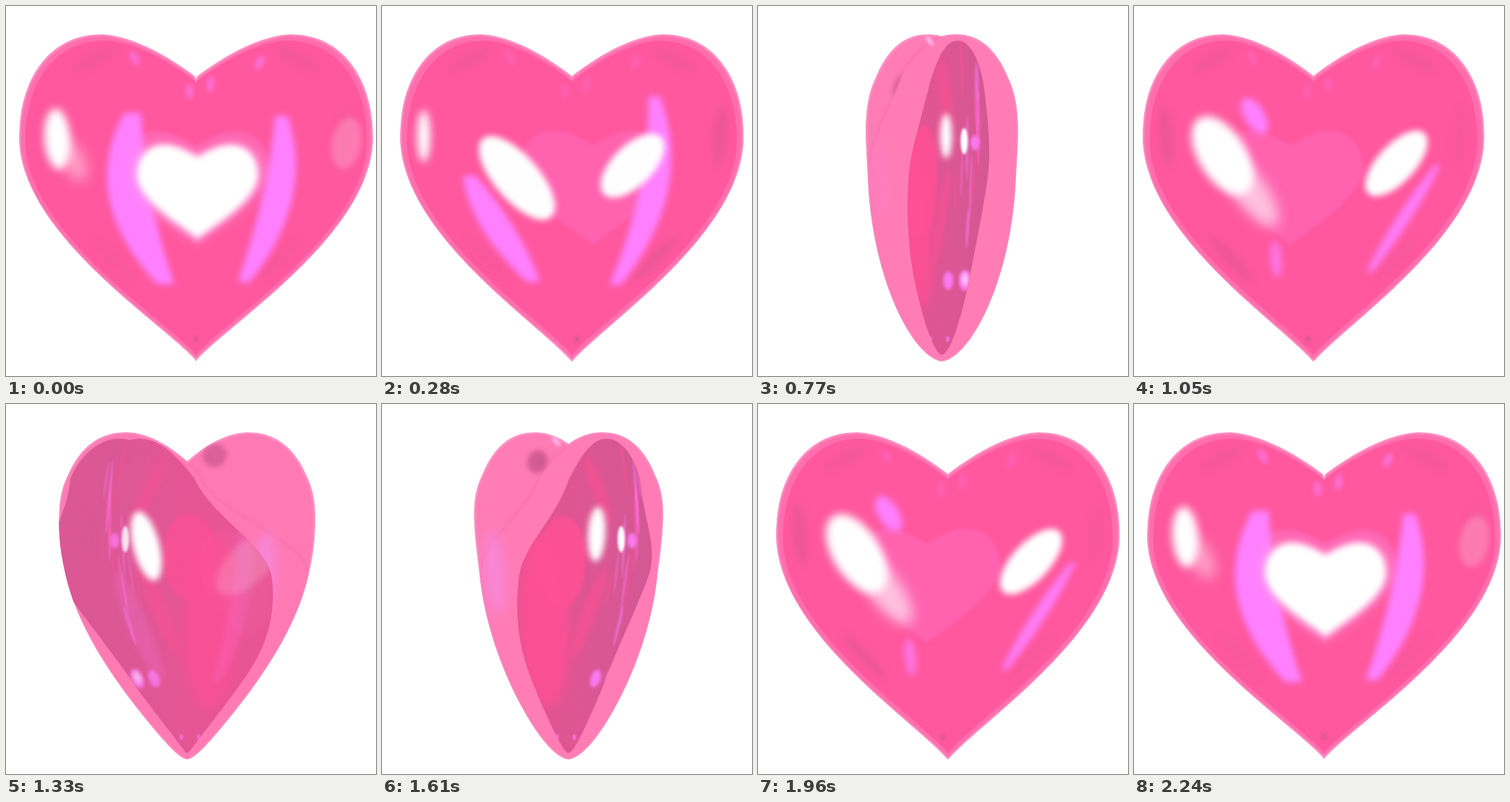
An HTML page with a canvas that plays this animation: 512 px wide and 512 px high, repeating every 2310 ms.

```html
<!DOCTYPE html>
<html lang="en">
<head>
<meta charset="utf-8">
<title>Spinning glass heart</title>
<style>
html, body { margin: 0; width: 100%; height: 100%; overflow: hidden; background: #fff; }
canvas { display: block; width: 100vmin; height: 100vmin; }
</style>
</head>
<body>
<canvas id="stage" width="512" height="512"></canvas>
<script>
const ctx = document.getElementById('stage').getContext('2d');
const STEP = 70, FRAMES = 33, RAD = Math.PI / 180;
const TOP = 39, NOTCH = 98, WIDEST = 185, TIP = 492;
const WHITE = '#fff', PURPLE = '#ff80ff', PINK = '#fd5095', DARK = '#cc568e';

const clamp = (v, lo, hi) => Math.min(hi, Math.max(lo, v));
const lerp = (a, b, t) => a + (b - a) * t;
const mix = (a, b, t) => a.map((v, i) => lerp(v, b[i], t));
const rgb = c => `rgb(${c.map(Math.round).join()})`;
const smooth = (lo, hi, v) => {
  const t = clamp((v - lo) / (hi - lo), 0, 1);
  return t * t * (3 - 2 * t);
};
// Blend of three poses for t from -1 to 1.
const pose = (t, left, mid, right) => t < 0 ? mix(mid, left, -t) : mix(mid, right, t);

function random(seed) {
  return () => (seed = seed * 16807 % 2147483647) / 2147483647;
}

// Horizontal slice of one lobe: middle, half width and depth at height y.
function slice(y) {
  const outer = y < WIDEST
    ? 130 + 115 * (1 - ((WIDEST - y) / (WIDEST - TOP)) ** 2.2) ** (1 / 2.2)
    : 245 * (1 - ((y - WIDEST) / (TIP - WIDEST)) ** 1.85) ** 1.18;
  const inner = y < NOTCH
    ? 130 * (1 - ((y - TOP) / (NOTCH - TOP)) ** 0.6)
    : -outer * smooth(NOTCH, 240, y);
  const depth = y < 225
    ? 98 * (1 - ((225 - y) / (225 - TOP)) ** 2) ** 0.45
    : 98 * (1 - ((y - 225) / (TIP - 225)) ** 2) ** 0.6;
  return { y, mid: (outer + inner) / 2, half: (outer - inner) / 2, depth };
}

const slices = [];
for (let i = 0; i <= 90; i++) {
  slices.push(slice(lerp(TOP, TIP, (1 - Math.cos(Math.PI * i / 90)) / 2)));
}

// Outline through all slices; span gives the middle and half width on screen.
function trace(span, inset) {
  const right = [], left = [];
  for (const q of slices) {
    const [mid, half] = span(q), w = Math.max(0, half);
    const y = q.y + inset * (1 - 2 * (q.y - TOP) / (TIP - TOP));
    right.push([mid + w, y]);
    left.unshift([mid - w, y]);
  }
  const path = new Path2D();
  for (const [x, y] of right.concat(left)) path.lineTo(x, y);
  path.closePath();
  return path;
}

const shell = (side, c, s, inset = 0) =>
  trace(q => [side * q.mid * c, Math.hypot(q.half * c, q.depth * s) - inset], inset);

const faceLobe = (side, c, s, lean) => trace(q => [
  lerp(side * q.mid * c * 0.965, 150 * c * (1 - smooth(50, 380, q.y)), lean),
  Math.hypot(0.965 * q.half * c, 0.45 * q.depth * s)
], 9);

function both(make) {
  const path = new Path2D();
  path.addPath(make(-1));
  path.addPath(make(1));
  return path;
}

const heart = both(side => shell(side, 1, 0));

function paint(path, color, alpha = 1, blur = 0) {
  if (alpha <= 0.004) return;
  ctx.globalAlpha = alpha;
  ctx.filter = blur ? `blur(${blur}px)` : 'none';
  ctx.fillStyle = color;
  ctx.fill(path);
  ctx.filter = 'none';
  ctx.globalAlpha = 1;
}

function spot(color, blur, [alpha, x, y, rx, ry, rot = 0], fade = 1) {
  const path = new Path2D();
  path.ellipse(x, y, Math.max(0, rx), Math.max(0, ry), rot * RAD, 0, 7);
  paint(path, color, alpha * fade, blur);
}

// Bowed band from one end to the other.
function band([alpha, x0, y0, x1, y1, bow, width], fade) {
  const x = (x0 + x1) / 2 + bow, y = (y0 + y1) / 2, path = new Path2D();
  path.moveTo(x0 - width / 4, y0);
  path.quadraticCurveTo(x - width, y, x1 - width / 4, y1);
  path.lineTo(x1 + width / 4, y1);
  path.quadraticCurveTo(x + width, y, x0 + width / 4, y0);
  paint(path, PURPLE, alpha * fade, 4);
}

function miniHeart(x, y, sx, sy, color, alpha, blur) {
  ctx.save();
  ctx.translate(x, y);
  ctx.scale(sx, sy);
  paint(heart, color, alpha, blur);
  ctx.restore();
}

// Rim of the glass with the near lobe on the right.
function drawRim(c, s, side, g) {
  const rim = rgb(mix([255, 110, 172], [255, 124, 181], side));
  const near = shell(1, c, s, 2);
  paint(both(k => shell(k, c, s)), '#ff9aca');
  paint(shell(-1, c, s, 2), rim, 1, 1);
  spot(DARK, 3, [0.85, -60 + 17 * g, 110 - 30 * g, 5 + 9 * g, 16, 20], side);
  paint(near, '#e4669f', side * 0.5, 4);
  paint(near, rim, 1, 1);
  spot('#f68be6', 8, [0.2 + 0.5 * g, -86 - 16 * g, 234, 9 + 5 * g, 58, -4], side);
  spot('#ffd0ff', 2, [0.8, -17, 48 + 4 * g, 3, 8, -38], side);
}

// Refractions inside the glass when it is seen edge-on.
function drawDepths(side, g) {
  const shift = y => g * (55 - y * 0.07);
  spot(PINK, 7, [0.9, -34, 300, 20 + 14 * g, 120, -3], side);
  spot(PINK, 2, [0.9, -28 + 18 * g, 245 - 25 * g, 22 + 12 * g, 80 - 15 * g, 3], side);
  spot(PINK, 3, [0.6, shift(290) * 0.8, 290, 6 + 4 * g, 66, 8 + 12 * g], side);
  spot(PINK, 4, [0.6, 4 + shift(120) * 0.8, 120, 9, 50, -6 - 14 * g], side);

  const rand = random(71);
  for (let i = 0; i < 14; i++) {
    const y = 85 + rand() * 270, x = 14 + rand() * 40 + shift(y);
    const turn = (y - 170) * 0.08 * (0.3 + g);
    spot(i % 2 ? PURPLE : PINK, 1, [0.2 + rand() * 0.35, x, y, 1.5 + rand() * 1.5, 18 + rand() * 35, turn], side);
  }
  for (const [x, y, size] of [[46, 189, 6], [32, 380, 8], [9, 380, 7]]) {
    spot(PURPLE, 2, [0.85, x + shift(y), y, size, size * 1.8, g * (y - 190) / 10], side);
  }
  spot(WHITE, 3, [0.7, 32 + shift(378), 378, 4, 9, 20 * g], side);
  spot(WHITE, 1.5, [1, 31 + shift(187), 187, 5, 18], side);
  for (let i = -1; i < 2; i++) spot(PURPLE, 1, [0.7, i * 24 + 8, 461, 2.5, 4], side);
}

// Reflections on the broad face; t runs from -1 to 1 through the frontal view.
function drawFront(t, front, squeeze) {
  ctx.save();
  ctx.scale(squeeze, 1);
  for (const k of [-1, 1]) {
    const shade = 0.14 + 0.24 * Math.max(0, k * t);
    spot(DARK, 4, [0.22, k * 140, 74, 9, 33, -k * 62], front);
    spot(DARK, 5, [shade, k * 205, 180, 10, 42, k * 5], front);
    spot(DARK, 5, [shade, k * 115, 350, 8, 42, k * 44], front);
  }
  for (const [x, y] of [[-85, 72], [-9, 118], [20, 108], [88, 78]]) {
    spot(PURPLE, 3, [0.6 - 0.35 * Math.abs(t), x, y, 5, 11, x / 3], front);
  }
  spot(DARK, 2, [0.7, 7 * t, 461, 4, 4], front);
  spot(PURPLE, 5, [-t, -82, 152, 14, 28, -32], front * (t < 0));
  spot(PURPLE, 5, [-t * 0.7, -52, 350, 8, 26, -5], front * (t < 0));
  band(pose(t, [0, -70, 150, -35, 375, -50, 40], [1, -88, 148, -42, 385, -52, 47],
    [1, -142, 235, -53, 382, -8, 36]), front);
  band(pose(t, [0.9, 173, 220, 78, 368, 0, 17], [1, 118, 152, 66, 382, 40, 34],
    [1, 114, 125, 60, 386, 52, 32]), front);
  ctx.restore();

  const glow = front * Math.max(0, 1 - 1.3 * Math.abs(t));
  miniHeart(2, 176, 0.37, 0.31, '#ffa4e0', glow * 0.6, 8);
  miniHeart(2, 181, 0.34, 0.287, WHITE, glow, 4);
}

function drawLights(t, tilt, front, g) {
  const edge = smooth(15, 69, tilt);
  const slim = [1, 6 + 33 * g, 180, 8 + 4 * g, 31 + 7 * g, 3 * g];
  const slimLeft = slim.map((v, i) => i === 1 || i === 5 ? -v : v);
  const left = pose(t, [1, -126, 207, 33, 61, -32], [1, -192, 184, 18, 42, -4], [1, -205, 180, 9, 36, 0]);
  const tail = pose(t, [0.6, -88, 255, 22, 60, -36], [0.42, -170, 213, 15, 32, -25], [0, -190, 200, 10, 30, 0]);
  const right = pose(t, [1, 115, 218, 26, 57, 43], [0.22, 208, 190, 20, 36, 10], [0, 225, 190, 10, 30, 0]);
  const broad = pose(t, [0, -45, 222, 22, 48, -43], [0, -45, 222, 22, 48, -43], [1, -76, 238, 31, 72, -41]);
  const small = pose(t, [0, 60, 235, 20, 38, 45], [0, 60, 235, 20, 38, 45], [1, 84, 221, 28, 56, 45]);
  spot(WHITE, 9, tail, front);
  spot(WHITE, 6, left, front);
  spot(WHITE, 4, small, front);
  spot(WHITE, 4, t < 0 ? mix(right, slim, edge) : right);
  spot(WHITE, 4, t > 0 ? mix(broad, slimLeft, edge) : broad);
}

function draw(n) {
  const turn = 360 * smooth(0, 1, n / (FRAMES - 1));
  const angle = (turn + 90) % 180 - 90;
  const tilt = Math.abs(angle), flip = angle > 0 ? -1 : 1;
  const c = Math.cos(tilt * RAD), s = Math.sin(tilt * RAD);
  const side = smooth(22, 60, tilt), front = 1 - side;
  const t = clamp(angle / 15.5, -1, 1);
  const g = clamp((81.6 - tilt) / 12.2, -0.5, 1.3);
  const squeeze = Math.min(1, c / Math.cos(15.5 * RAD));

  ctx.setTransform(1, 0, 0, 1, 0, 0);
  ctx.fillStyle = WHITE;
  ctx.fillRect(0, 0, 512, 512);
  ctx.translate(255.5 + 7.5 * Math.cos(turn * RAD), 0);

  ctx.save();
  ctx.scale(flip, 1);
  ctx.clip(both(k => shell(k, c, s)));
  drawRim(c, s, side, g);
  const face = both(k => faceLobe(k, c, s, side));
  const fill = ctx.createLinearGradient(-50, 0, 60 + 40 * g, 0);
  fill.addColorStop(0, rgb(mix([255, 88, 158], [228, 84, 146], side)));
  fill.addColorStop(1, rgb(mix([255, 88, 158], [212, 88, 147], side)));
  paint(face, fill, 1, 0.7);
  ctx.clip(face);
  drawDepths(side, g);
  ctx.scale(flip, 1);
  miniHeart(110 * Math.sin(angle * RAD), 159, 0.41 * squeeze, 0.35, '#ff6cbc', 0.6 * front, 2);
  drawFront(t, front, squeeze);
  drawLights(t, tilt, front, g);
  ctx.restore();
}

let shown = -1;
const start = performance.now();
function tick() {
  const n = Math.floor((performance.now() - start) / STEP) % FRAMES;
  if (n !== shown) draw(shown = n);
  requestAnimationFrame(tick);
}
tick();
</script>
</body>
</html>
```
